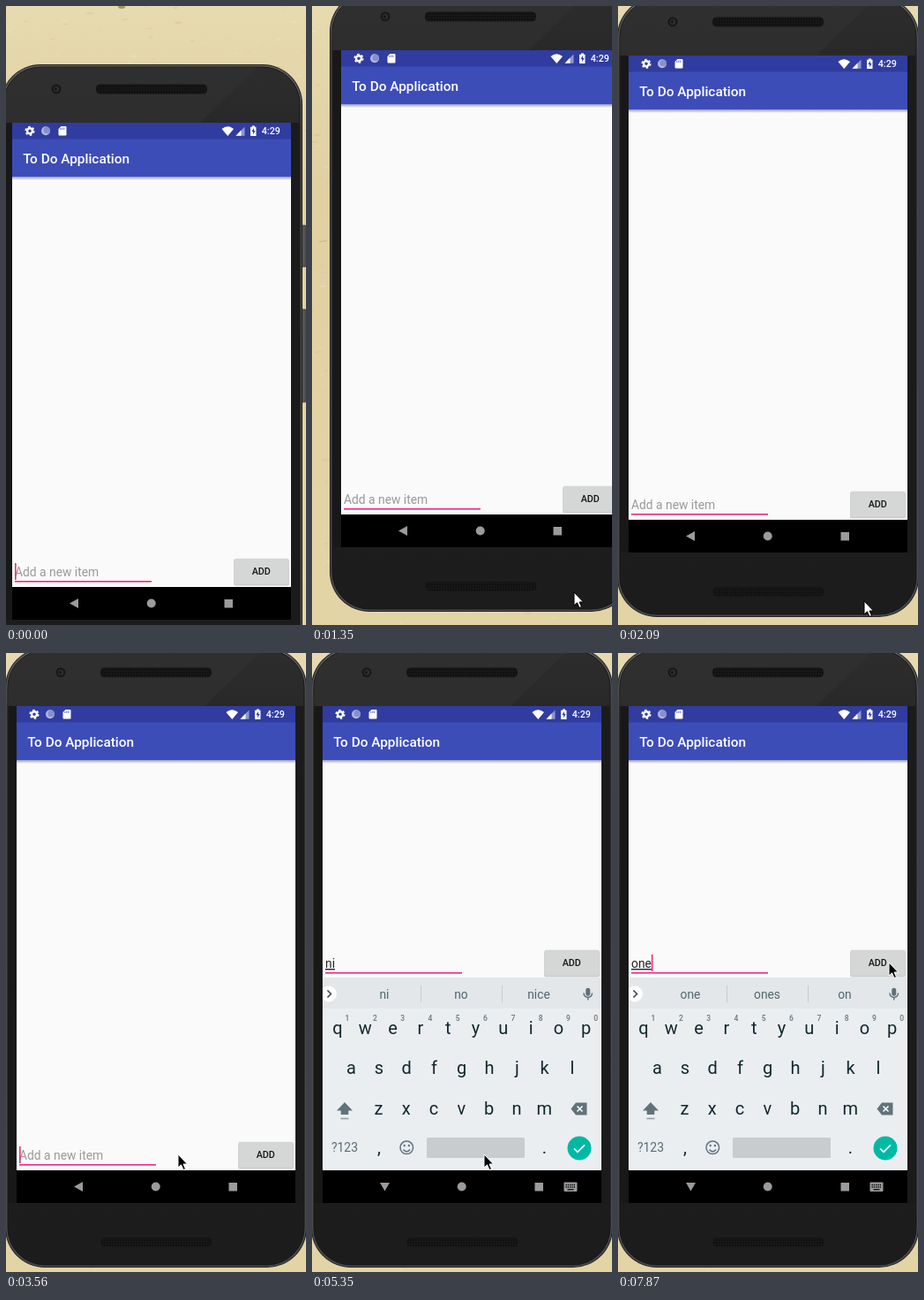
An HTML page that plays this animation: 340x700 px, repeating every 8000 ms.

```html
<!DOCTYPE html>
<html lang="en">
<head>
<meta charset="utf-8">
<title>To Do Application</title>
<style>
html, body { margin: 0; width: 100%; height: 100%; overflow: hidden; background: #e4d6ab; }
svg { display: block; width: 340px; height: 700px; font-family: Roboto, "Noto Sans", sans-serif; }
.mid { text-anchor: middle; }
.key { font-size: 20px; fill: #10292f; }
.digit { font-size: 8.5px; font-weight: 500; fill: #66757c; }
.word { font-size: 13.8px; fill: #52666f; }
.field { font-size: 13.84px; }
#typed { fill: #222; text-decoration: underline; }
</style>
</head>
<body>
<svg viewBox="0 0 340 700" xmlns="http://www.w3.org/2000/svg">
  <defs>
    <linearGradient id="paper" x1="0" y1="0" x2="0" y2="1">
      <stop offset="0" stop-color="#e7dab0"/><stop offset=".3" stop-color="#e0d0a2"/>
      <stop offset="1" stop-color="#e3d4a6"/>
    </linearGradient>
    <linearGradient id="shell" x1="0" y1="0" x2="0" y2="1">
      <stop offset="0" stop-color="#2d2d2d"/><stop offset=".12" stop-color="#272727"/>
      <stop offset=".5" stop-color="#202020"/><stop offset="1" stop-color="#1c1c1c"/>
    </linearGradient>
    <linearGradient id="rim" x1="0" y1="0" x2="0" y2="1">
      <stop offset="0" stop-color="#606060"/><stop offset=".1" stop-color="#474747"/>
      <stop offset="1" stop-color="#4c4c4c"/>
    </linearGradient>
    <linearGradient id="drop" x1="0" y1="0" x2="0" y2="1">
      <stop offset="0" stop-color="#a9abb8"/><stop offset="1" stop-color="#fafafa"/>
    </linearGradient>
    <pattern id="mesh" width="3" height="3" patternUnits="userSpaceOnUse">
      <rect width="3" height="3" fill="#181818"/><circle cx="1" cy="1" r=".8" fill="#050505"/>
    </pattern>
    <clipPath id="screen"><rect x="12" y="60" width="316" height="525"/></clipPath>
    <clipPath id="body"><rect x="2" y="-3" width="336" height="695" rx="42"/></clipPath>
  </defs>

  <rect width="340" height="700" fill="url(#paper)"/>
  <g id="flecks"></g>
  <ellipse cx="131" cy="1" rx="4" ry="2" fill="#a8965c"/>
  <path d="M8 267q4-2 9-1" stroke="#c9b683" fill="none"/>

  <g id="phone">
    <g fill="#555" stroke="#333" stroke-width=".7">
      <rect x="339" y="176" width="6" height="47" rx="1"/>
      <rect x="339" y="271" width="6" height="105" rx="1"/>
    </g>
    <rect x="-1" y="-6" width="342" height="701" rx="45" fill="#222"/>
    <rect x="0" y="-5" width="340" height="699" rx="44" fill="url(#rim)"/>
    <rect x="2" y="-3" width="336" height="695" rx="42" fill="url(#shell)" stroke="#151515"/>
    <path d="M2-3H290L225 60H2Z" fill="#333" opacity=".45" clip-path="url(#body)"/>
    <rect x="3" y="60" width="9" height="562" fill="#181818"/>
    <rect x="328" y="60" width="9" height="562" fill="#1b1b1b"/>
    <circle cx="62" cy="22" r="5.5" fill="#191919"/>
    <circle cx="62" cy="22" r="3" fill="#303436"/><circle cx="61.5" cy="22" r="1.7" fill="#131719"/>
    <g fill="url(#mesh)" stroke="#141414">
      <rect x="107.5" y="17" width="125" height="10" rx="4"/>
      <rect x="108" y="661.5" width="125" height="9.5" rx="4"/>
    </g>

    <rect x="12" y="60" width="316" height="525" fill="#fafafa"/>
    <rect x="12" y="60" width="316" height="19" fill="#303c9f"/>
    <rect x="12" y="78.5" width="316" height="43" fill="#3d4db8"/>
    <rect x="12" y="121.5" width="316" height="3.5" fill="url(#drop)"/>
    <text x="24.3" y="105.8" font-size="15.38" font-weight="500" fill="#fff">To Do Application</text>
    <g fill="#fff">
      <circle cx="32" cy="69.3" r="3" fill="none" stroke="#fff" stroke-width="2.4"/>
      <circle cx="32" cy="69.3" r="4.7" fill="none" stroke="#fff" stroke-width="1.7" stroke-dasharray="2.46"/>
      <circle cx="50" cy="69.3" r="5" fill="#b0b6df"/>
      <circle cx="51.2" cy="68.4" r="3.7" fill="#8790cb"/>
      <path d="M67.5 64H72.5Q73.5 64 73.5 65V73.5Q73.5 74.5 72.5 74.5H65.5Q64.5 74.5 64.5 73.5V67Z"/>
      <path d="M66.8 66v2m2-2.5v2.5m2-2.5v2.5" stroke="#303c9f" stroke-width=".7"/>
      <path d="M249.5 67Q256.3 61.500 263 67L256.300 75Z"/>
      <path d="M265.500 74.700L275.500 64.500V74.700Z" fill="#8f97cf"/>
      <path d="M265.500 74.700L271.500 68.500V74.700Z"/>
      <path d="M284 63.500h3v1.200h1.500v10.300h-6.500v-10.300h2Z"/>
      <path d="M286 66l-2.600 4h1.700v3.200l2.500-4.200h-1.600Z" fill="#303c9f"/>
      <text x="294.7" y="73.3" font-size="10.77" font-weight="500">4:29</text>
    </g>

    <g id="row">
      <text id="hint" class="field" x="15" y="573" fill="#999">Add a new item</text>
      <text id="typed" class="field" x="15" y="573"></text>
      <rect x="15" y="578" width="155" height="1.6" fill="#ec2b80"/>
      <rect id="caret" x="15" y="558" width="1.6" height="19" fill="#ec2b80"/>
      <rect x="263" y="554" width="63" height="29.500" rx="2" fill="#bbb" opacity=".7"/>
      <rect x="263.500" y="552.800" width="62" height="29" rx="1.500" fill="#d5d6d6"/>
      <text class="mid" x="294.300" y="571" font-size="10.77" font-weight="500" fill="#161616">ADD</text>
    </g>

    <g clip-path="url(#screen)">
      <g id="board">
        <rect x="12" y="367" width="316" height="218" fill="#ebeef1"/>
        <rect x="12" y="367" width="316" height="35" fill="#e3e7e9"/>
        <path d="M123.500 376v19M215.500 376v19" stroke="#c6ccd0"/>
        <circle cx="19" cy="385.500" r="9" fill="#fff"/>
        <path d="M17.500 381.500l4 4-4 4" fill="none" stroke="#37474f" stroke-width="1.600"/>
        <g id="words"></g>
        <g fill="none" stroke="#607078" stroke-width="1.500">
          <rect x="311" y="379.500" width="3.500" height="7.500" rx="1.750" fill="#607078"/>
          <path d="M308 384.500c0 6.500 9.500 6.500 9.500 0M312.750 389.500v3"/>
        </g>
        <g id="keys"></g>
        <path d="M37 508l9 9.500h-4.700v4.500h-8.600v-4.500H28Z" fill="#60737b"/>
        <path d="M32.500 526.500h9" stroke="#8d999f" stroke-width="1.500"/>
        <path d="M299 508.500H311.500V522.500H299L293.500 515.500Z" fill="#60737b"/>
        <path d="M300.500 512.500l6 6m0-6l-6 6" stroke="#fff" stroke-width="1.500"/>
        <text class="mid" x="37" y="564.300" font-size="14" fill="#596b73">?123</text>
        <g fill="none" stroke="#60737b" stroke-width="1.500">
          <circle cx="107.300" cy="559.300" r="7.300"/>
          <path d="M103.500 561.500q3.800 4.500 7.600 0"/>
        </g>
        <g fill="#60737b"><circle cx="104.700" cy="557" r="1.200"/><circle cx="109.900" cy="557" r="1.200"/></g>
        <rect x="130" y="548" width="111" height="23" rx="1.500" fill="#c8ccce"/>
        <circle cx="303" cy="560" r="13.500" fill="#00b9a5"/>
        <path d="M297 560.300l4 4 8-8" fill="none" stroke="#fff" stroke-width="1.800"/>
      </g>
    </g>

    <rect x="12" y="585" width="316" height="37" fill="#000"/>
    <g fill="#9b9b9b">
      <path id="back"/>
      <circle cx="169.700" cy="603.500" r="5"/>
      <rect x="252.500" y="599" width="9.500" height="9.500"/>
      <g id="switcher">
        <rect x="285.500" y="598.500" width="15" height="10.500" rx="1"/>
        <path d="M287.500 601.500h11.500m-11.500 2.500h11.500" stroke="#000" stroke-width="1.300" stroke-dasharray="1.300 1"/>
        <path d="M289.500 606.800h7" stroke="#000" stroke-width="1.200"/>
      </g>
    </g>
  </g>

  <path id="pointer" d="M0 0V15L3.500 11.800L6 17.500L8.500 16.400L6 11H10.500Z" stroke-width="1"/>
</svg>
<script>
const LOOP = 8000;
const $ = id => document.getElementById(id);

// Each row: start time, then the value held until the next row.
const phoneSteps = [
  [0, [-5, 72]], [1050, [-1, 50]], [1200, [11, 18]], [1350, [21, -10]], [1500, [19, -14]],
  [1650, [14, -13]], [1800, [8, -10]], [1950, [3, -7]], [2090, [0, -4]], [2240, [0, 0]]
];
const pointerSteps = [
  [0, [271, 745]], [1050, [275, 723]], [1200, [287, 691]], [1350, [297, 663]], [1500, [296, 660]],
  [1650, [292, 662]], [1800, [286, 666]], [1950, [282, 670]], [2090, [279, 673]], [2240, [279, 677]],
  [2530, [269, 664]], [2680, [243, 630]], [2830, [216, 594]], [2970, [200, 573]], [3110, [195, 567]],
  [7580, [203, 555]], [7730, [268, 428]], [7870, [307, 350]]
];
const caretSteps = [
  [0, 1], [150, 0], [600, 1], [1200, 0], [1650, 1], [2090, 0], [2530, 1], [3110, 0],
  [3560, 1], [4160, 0], [4600, 1], [5050, 0], [5500, 1], [6980, 0], [7580, 1]
];
const boardSteps = [[0, 230], [4600, 120], [4750, 28], [4900, 0]];
const typedSteps = [
  [0, ""], [5350, "ni"], [5500, "n"], [5640, ""], [6090, "o"], [6240, "on"], [6390, "one"]
];
const wordSteps = [
  [0, ["", "", ""]], [5350, ["ni", "no", "nice"]], [5500, ["n", "no", "not"]], [5640, ["", "", ""]],
  [6090, ["o", "of", "on"]], [6240, ["on", "only", "one"]], [6530, ["one", "ones", "on"]]
];

const at = (steps, t) => steps.findLast(([start]) => start <= t)[1];

function add(parent, tag, attrs, text = "") {
  const el = document.createElementNS("http://www.w3.org/2000/svg", tag);
  for (const name in attrs) el.setAttribute(name, attrs[name]);
  el.textContent = text;
  return parent.appendChild(el);
}
const label = (parent, kind, x, y, text) => add(parent, "text", { class: "mid " + kind, x, y }, text);
const move = (id, x, y) => $(id).setAttribute("transform", `translate(${x} ${y})`);
const show = (id, on) => $(id).setAttribute("visibility", on ? "visible" : "hidden");

let seed = 7;
const rand = () => (seed = seed * 16807 % 2147483647) / 2147483647;
for (let i = 0; i < 420; i++) {
  add($("flecks"), "ellipse", {
    cx: rand() * 340, cy: rand() * 700, rx: 1 + rand() * 4, ry: .5 + rand(),
    fill: rand() < .5 ? "#d3c08d" : "#eee3bf", opacity: .2 + rand() * .3
  });
}

[["qwertyuiop", 29, 431], ["asdfghjkl", 44.500, 476], ["zxcvbnm", 75.500, 521.500]].forEach(([row, x, y], r) =>
  [...row].forEach((letter, i) => {
    const kx = x + i * 31.3;
    label($("keys"), "key", kx, y, letter);
    if (r === 0) label($("keys"), "digit", kx + 11, 416, (i + 1) % 10);
  }));
label($("keys"), "key", 76, 566, ",");
label($("keys"), "key", 263.500, 566, ".");
const words = [82, 169, 257].map(x => label($("words"), "word", x, 390.500, ""));

function draw(t) {
  const typed = at(typedSteps, t);
  const open = t >= 4600;
  const [px, py] = at(pointerSteps, t);
  const inside = py < 622;

  move("phone", ...at(phoneSteps, t));
  move("row", 0, t >= 4900 ? -217 : 0);
  move("board", 0, at(boardSteps, t));
  show("board", open);
  show("switcher", open);
  show("hint", !typed);
  $("back").setAttribute("d", open ? "M77 599H88L82.500 608.500Z" : "M77 603.500L87 598V609Z");

  $("typed").textContent = typed;
  $("caret").setAttribute("x", 15 + (typed ? $("typed").getComputedTextLength() : 0));
  show("caret", at(caretSteps, t));
  at(wordSteps, t).forEach((word, i) => words[i].textContent = word);

  move("pointer", px, py);
  $("pointer").setAttribute("fill", inside ? "#000" : "#fff");
  $("pointer").setAttribute("stroke", inside ? "#fff" : "#000");
}

const begin = performance.now();
function tick() {
  draw((performance.now() - begin) % LOOP);
  requestAnimationFrame(tick);
}
tick();
</script>
</body>
</html>
```
